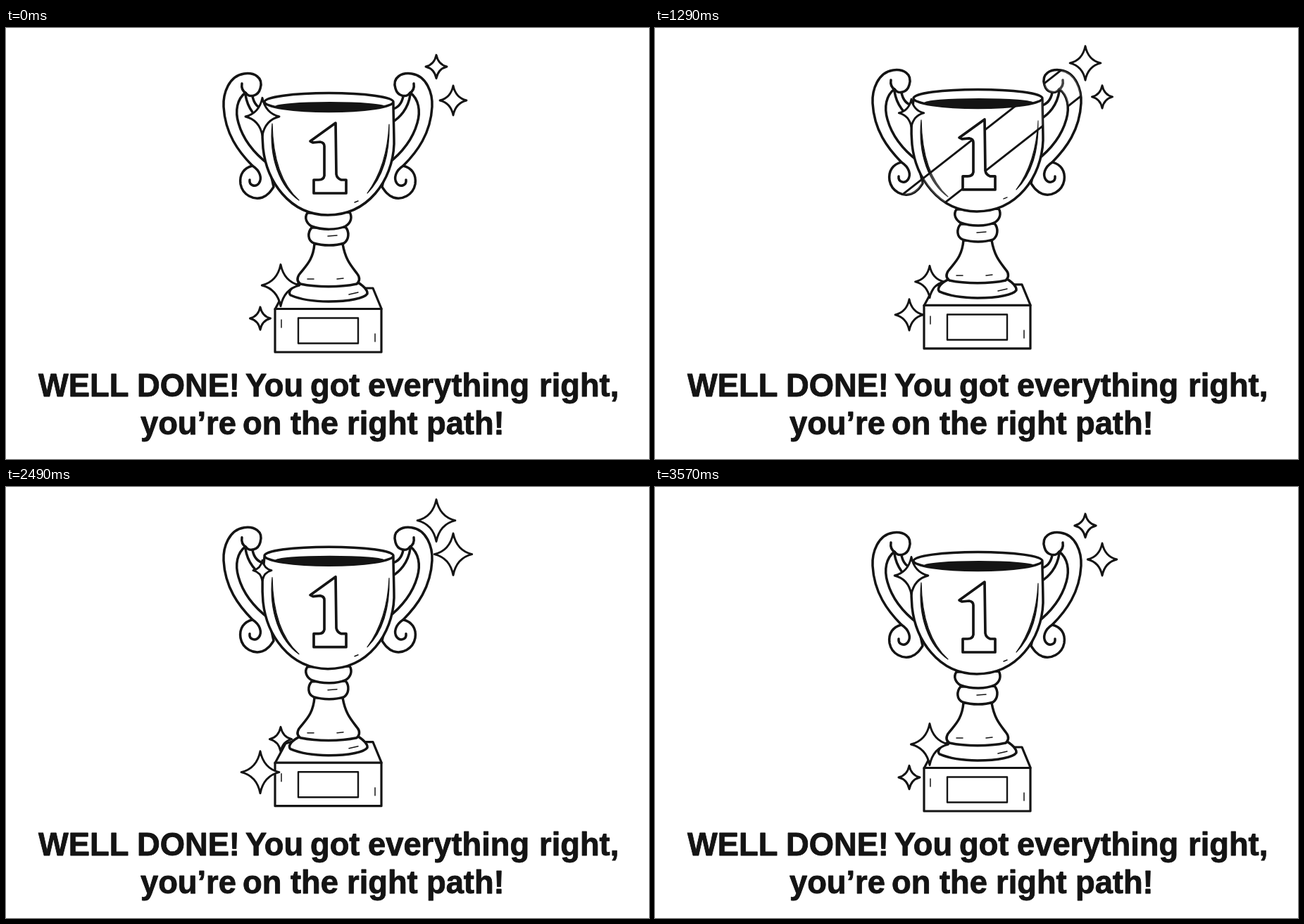
These frames come from a looping animation (913x613 px, 3600 ms). An HTML page with a canvas:

```html
<!DOCTYPE html>
<html lang="en">
<head>
<meta charset="utf-8">
<title>Well done</title>
<style>
  html, body { margin: 0; width: 100%; height: 100%; overflow: hidden; background: #fff; }
  canvas { display: block; }
</style>
</head>
<body>
<canvas id="stage" width="913" height="613"></canvas>
<script>
const ctx = document.getElementById('stage').getContext('2d');
const INK = '#141414', PAPER = '#fff';
const LOOP = 3600, STEP = 30, BOB = 1800, TWINKLE = 1750;

const path = d => new Path2D(d);
const MIRROR = new DOMMatrix([-1, 0, 0, 1, 914, 0]);
const mirrored = p => {
  const m = new Path2D();
  m.addPath(p, MIRROR);
  return m;
};

const base = path('M382 400 L397 372 L404 370 H521 L533 399 V461 H382 Z');
const baseEdge = path('M382 399.5 H533');
const plaque = path('M415 412.5 H500 V448.5 H415 Z');
const foot = path('M416 363 C404 369 400 376 404 380 C420 387 440 389 458 389 C488 389 509 384 513 378 C514 372 506 366 500 362 Z');
const stem = path('M438 307 C436 331 425 339 416 351 C412 358 415 362 418 364 C442 369 474 369 498 364 C502 361 503 355 499 350 C490 338 482 330 478 307 Z');
const lowerRing = path('M434 284 C428 291 428 302 437 306 C450 310 468 310 480 306 C487 301 488 290 482 283 Z');
const upperRing = path('M428 263 C423 270 427 278 434 282 C450 288 470 287 482 282 C490 277 492 269 488 262 Z');
const cup = path('M367 107 C364 130 363 150 365 171 C370 217 402 266 457 266 C514 266 549 217 551 165 C551 145 550 125 550 107 Z');
const rim = path('M367 105 A91.5 12.5 0 1 1 550 105 A91.5 13.5 0 1 1 367 105 Z');
const opening = path('M382 111.5 A78 6.5 0 1 1 538 111.5 A78 6.5 0 1 1 382 111.5 Z');
const one = path('M468 135 L432 161 L436 163 L446 162 Q452 163 452 168 V210 Q451 216 444 216 H437 V235 H483 V216 H476 Q470 214 469 208 Z');
const gleams = path('M378 136 C373 185 389 226 416 245 C393 224 379 190 378 136 Z M544 137 C542 180 531 210 513 235 C535 213 545 180 544 137 Z');
const dashes = path('M495 248 L500 246 M457 296 L470 295 M428 357 H437 M470 357 L479 356 M487 379 L500 376 M391 415 V426 M524 435 V446');

const handle = path('M361 86 C366 70 352 63 338 65 C317 68 308 92 309 112 C311 150 330 176 350 196 C338 199 331 208 333 222 C336 238 352 245 364 241 C372 238 376 232 380 226 L373 194 C352 178 337 160 330 135 C325 118 328 101 340 92 C346 100 358 97 361 86 Z');
const handleLines = path('M341 93 C336 90 334 85 335 79 M340 95 C343 115 355 128 366 134 M350 97 C352 108 358 114 367 116 M350 196 C361 203 364 214 359 221 C354 227 345 224 346 216');
const handles = [[handle, handleLines], [mirrored(handle), mirrored(handleLines)]];

const shineArea = new Path2D(cup);
handles.forEach(([body]) => shineArea.addPath(body));

// Tip radius swings around mean by amp and is largest at peak (ms).
const stars = [
  { x: 611, y: 55, mean: 23.7, amp: 7, peak: 875 },
  { x: 635, y: 103, mean: 23.7, amp: 8.2, peak: 530 },
  { x: 364, y: 126, mean: 20.2, amp: 6.5, peak: 0 },
  { x: 390, y: 366, mean: 23.2, amp: 6.5, peak: 0 },
  { x: 361, y: 413, mean: 23.1, amp: 7.1, peak: 815 }
];

const lines = [
  { y: 524, words: [['WELL', 46], ['DONE!', 186], ['You', 340], ['got', 432], ['everything', 514], ['right,', 757]] },
  { y: 578, words: [['you’re', 191], ['on', 336], ['the', 404], ['right', 484], ['path!', 597]] }
];

function stroke(shape, width = 3.5) {
  ctx.lineWidth = width;
  ctx.stroke(shape);
}

function solid(shape, width) {
  ctx.fillStyle = PAPER;
  ctx.fill(shape);
  stroke(shape, width);
}

function drawShine(t) {
  const mid = 506 + (t - 1290);
  if (mid < 150 || mid > 770) return;
  const at = (x, y) => [x + (150 - y) / 0.785, y];
  const left = mid - 37.5, right = mid + 37.5;
  ctx.save();
  ctx.clip(shineArea);
  ctx.beginPath();
  ctx.moveTo(...at(left, 40));
  ctx.lineTo(...at(right, 40));
  ctx.lineTo(...at(right, 280));
  ctx.lineTo(...at(left, 280));
  ctx.closePath();
  ctx.fillStyle = 'rgba(255,255,255,0.2)';
  ctx.fill();
  ctx.lineWidth = 2.9;
  ctx.stroke();
  ctx.restore();
}

function drawTrophy(t) {
  solid(base, 3.2);
  stroke(baseEdge, 3.2);
  stroke(plaque, 2.4);
  [foot, stem, lowerRing, upperRing].forEach(s => solid(s));
  handles.forEach(([body, detail]) => {
    solid(body);
    stroke(detail);
  });
  solid(cup);
  ctx.fillStyle = INK;
  ctx.fill(gleams);
  stroke(gleams, 1.2);
  stroke(dashes, 1.5);
  drawShine(t);
  solid(rim);
  ctx.fillStyle = INK;
  ctx.fill(opening);
  solid(one, 3.7);
}

function drawStar({ x, y, mean, amp, peak }, t) {
  const h = mean + amp * Math.cos(2 * Math.PI * (t - peak) / TWINKLE);
  const w = h * 0.9, k = 0.18;
  const tips = [[0, -1], [1, 0], [0, 1], [-1, 0]];
  ctx.beginPath();
  ctx.moveTo(x, y - h);
  tips.forEach(([ax, ay], i) => {
    const [bx, by] = tips[(i + 1) % 4];
    ctx.quadraticCurveTo(x + (ax + bx) * w * k, y + (ay + by) * h * k, x + bx * w, y + by * h);
  });
  ctx.closePath();
  ctx.fillStyle = PAPER;
  ctx.fill();
  ctx.lineWidth = 2.9;
  ctx.stroke();
}

function drawText() {
  ctx.font = 'bold 45.3px "Liberation Sans", Arial, sans-serif';
  ctx.fillStyle = INK;
  ctx.lineWidth = 0.9;
  lines.forEach(({ y, words }) => words.forEach(([word, x]) => {
    ctx.fillText(word, x, y);
    ctx.strokeText(word, x, y);
  }));
}

function draw(now) {
  const t = Math.floor(now % LOOP / STEP) * STEP;
  ctx.fillStyle = PAPER;
  ctx.fillRect(0, 0, 913, 613);
  ctx.strokeStyle = INK;
  ctx.lineJoin = ctx.lineCap = 'round';
  drawText();
  ctx.save();
  ctx.translate(0, -4.2 * (1 - Math.cos(2 * Math.PI * t / BOB)));
  drawTrophy(t);
  stars.forEach(s => drawStar(s, t));
  ctx.restore();
}

let start;
function tick(now) {
  start ??= now;
  draw(now - start);
  requestAnimationFrame(tick);
}
draw(0);
requestAnimationFrame(tick);
</script>
</body>
</html>
```
